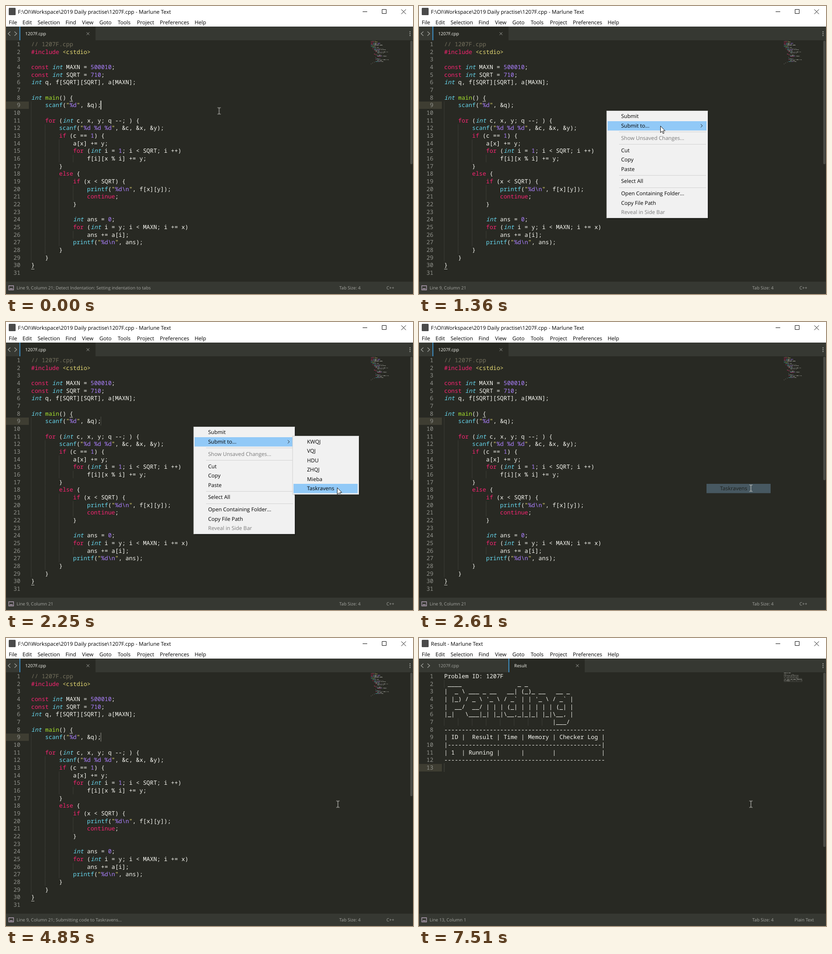
An HTML page for the animation above (8000 ms loop, 889 px wide and 630 px high).

```html
<!DOCTYPE html>
<html lang="en">
<head>
<meta charset="utf-8">
<title>Editor</title>
<style>
html, body { margin: 0; width: 100%; height: 100%; overflow: hidden; background: #282923; }
svg { display: block; width: 889px; height: 630px; text-rendering: geometricPrecision; }
text { white-space: pre; font: 11.6px 'Open Sans', 'Noto Sans', sans-serif; }
.small text { font-size: 9.65px; fill: #a4a5a0; }
.small .on { fill: #f8f8f2; }
.lines text { font: 500 12.727px 'Noto Sans Mono', 'DejaVu Sans Mono', monospace; fill: #f8f8f2; }
.lines .num { fill: #90918b; text-anchor: end; }
.lines .key { fill: #f92472; }
.lines .type { fill: #67d8ef; font-style: italic; }
.lines .call { fill: #67d8ef; }
.lines .name { fill: #a6e22c; }
.lines .lit { fill: #ac80ff; }
.lines .str { fill: #e7db74; }
.lines .note { fill: #74705d; }
.lines .mini text { font-weight: 700; }
.guide { fill: #3d3e38; }
.gray { fill: #7a7a7a; }
.sel { fill: #91c9f7; }
.mark { fill: #3fa0df; }
.stroke { fill: none; stroke: #a4a5a0; }

.step { animation: 8s step-end infinite; }
.glide { animation: 8s linear infinite; }
#code { animation-name: code; }
#result { animation-name: result; }
#caret { animation-name: caret; }
#caret2 { animation-name: caret2; }
#detect { animation-name: detect; }
#sending { animation-name: sending; }
#menu { animation-name: menu; }
#submenu { animation-name: submenu; }
#flash { animation-name: flash; }
#hover { animation-name: hover; }
#pick { animation-name: pick; }
#beam { animation-name: beam; }
#beamAt { animation-name: beamAt; }
#arrow { animation-name: arrow; }
#arrowAt { animation-name: arrowAt; }

@keyframes code { 0% { opacity: 1 } 85.25%, 100% { opacity: 0 } }
@keyframes result { 0% { opacity: 0 } 85.25%, 100% { opacity: 1 } }
@keyframes caret {
  0%, 9.375%, 22.375%, 36.125%, 48.75%, 62.25%, 75.875% { opacity: 1 }
  .375%, 8.625%, 13.125%, 21.75%, 26.375%, 35.25%, 39.625%, 48%, 52.375%, 61.375%, 65.75%, 74.75%, 79% { opacity: .7 }
  1.125%, 8%, 13.875%, 21.125%, 27.25%, 34.5%, 40.75%, 47.25%, 53.25%, 60.625%, 66.875%, 73.75%, 79.75% { opacity: .35 }
  28.125% { opacity: .12 }
  2%, 14.75%, 30.625%, 41.875%, 54.25%, 68%, 80.625%, 100% { opacity: 0 }
}
@keyframes caret2 {
  0% { opacity: 0 } 85.25% { opacity: 1 } 90.375% { opacity: .85 }
  92.875% { opacity: .55 } 93.375% { opacity: .3 } 93.875%, 100% { opacity: .1 }
}
@keyframes detect { 0% { opacity: 1 } 8.75%, 100% { opacity: 0 } }
@keyframes sending { 0% { opacity: 0 } 46% { opacity: 1 } 79.75%, 100% { opacity: 0 } }
@keyframes menu {
  0%, 13.12% { opacity: 0 } 13.125% { opacity: .3 }
  14.6%, 30.62% { opacity: 1 } 30.625%, 100% { opacity: 0 }
}
@keyframes submenu {
  0%, 21.12% { opacity: 0 } 21.125% { opacity: .2 } 22.375% { opacity: .88 }
  22.75%, 30.62% { opacity: 1 } 30.625%, 100% { opacity: 0 }
}
@keyframes flash {
  0%, 30.62% { opacity: 0 } 30.625% { opacity: .9 } 32.625% { opacity: .3 } 34.5%, 100% { opacity: 0 }
}
@keyframes hover {
  0% { opacity: 0; transform: translateY(-20.4px) }
  13.875% { opacity: 1; transform: translateY(-20.4px) }
  15.375%, 100% { opacity: 1; transform: none }
}
@keyframes pick {
  0% { opacity: 0; transform: none }
  23.5% { opacity: 1; transform: none }
  24.5% { opacity: 1; transform: translateY(20.4px) }
  25.5% { opacity: 1; transform: translateY(40.8px) }
  26.25% { opacity: 1; transform: translateY(61.2px) }
  26.875% { opacity: 1; transform: translateY(81.6px) }
  27.5%, 100% { opacity: 1; transform: translateY(102px) }
}
@keyframes beam { 0% { opacity: 1 } 13.125% { opacity: 0 } 30.625%, 100% { opacity: 1 } }
@keyframes beamAt {
  0%, 8.75% { transform: translate(465.5px, 229.5px) }
  10.25%, 30.62% { transform: translate(410.5px, 229.5px) }
  30.625%, 100% { transform: translate(725px, 363.5px) }
}
@keyframes arrow { 0% { opacity: 0 } 13.125% { opacity: 1 } 30.625%, 100% { opacity: 0 } }
@keyframes arrowAt {
  0%, 13.125% { transform: translate(410px, 229px); animation-timing-function: ease-in-out }
  17%, 21% { transform: translate(527px, 262px) }
  22.375% { transform: translate(575px, 259px) }
  23.5% { transform: translate(640px, 266px) }
  24.5% { transform: translate(675px, 284px) }
  25.5% { transform: translate(695px, 303px) }
  26.25% { transform: translate(707px, 322px) }
  26.875% { transform: translate(714px, 342px) }
  27.5% { transform: translate(720px, 357px) }
  28.125%, 100% { transform: translate(723px, 362px) }
}
</style>
</head>
<body>
<script type="text/plain" id="codeText">
// 1207F.cpp
#include <cstdio>

const int MAXN = 500010;
const int SQRT = 710;
int q, f[SQRT][SQRT], a[MAXN];

int main() {
    scanf("%d", &q);

    for (int c, x, y; q --; ) {
        scanf("%d %d %d", &c, &x, &y);
        if (c == 1) {
            a[x] += y;
            for (int i = 1; i < SQRT; i ++)
                f[i][x % i] += y;
        }
        else {
            if (x < SQRT) {
                printf("%d\n", f[x][y]);
                continue;
            }

            int ans = 0;
            for (int i = y; i < MAXN; i += x)
                ans += a[i];
            printf("%d\n", ans);
        }
    }
}

</script>
<script type="text/plain" id="resultText">
Problem ID: 1207F
 ____                _ _
|  _ \ ___ _ __   __| (_)_ __   __ _
| |_) / _ \ '_ \ / _` | | '_ \ / _` |
|  __/  __/ | | | (_| | | | | | (_| |
|_|   \___|_| |_|\__,_|_|_| |_|\__, |
                               |___/
----------------------------------------------
| ID |  Result | Time | Memory | Checker Log |
|--------------------------------------------|
| 1  | Running |      |        |             |
----------------------------------------------

</script>

<svg viewBox="0 0 889 630">
  <rect width="889" height="630" fill="#282923"/>
  <rect width="889" height="45" fill="#fff"/>
  <rect x="6" y="4" width="15" height="16" rx="1.5" fill="#4a4a4a"/>
  <path d="M779 12.5h10M821.5 7.5h9v9h-9zM863.5 7.5l10 10M873.5 7.5l-10 10" fill="none" stroke="#111"/>
  <g id="bar"></g>
  <rect y="45" width="889" height="30" fill="#363832"/>
  <rect y="603" width="889" height="27" fill="#363832"/>
  <path class="stroke" stroke-width="1.2" d="M9.5 56l-5 4.5 5 4.5M18.5 56l5 4.5-5 4.5"/>
  <path d="M881.5 55.5h2v2h-2zM881.5 59.5h2v2h-2zM881.5 63.5h2v2h-2z" fill="#b0b1ac"/>
  <path d="M6 612h10.5v9h-10.5z" fill="none" stroke="#b5a3b8" stroke-width="1.3"/>
  <path d="M8 617.5h6.5v1.8h-6.5z" fill="#b5a3b8"/>
  <g class="small"><text x="728" y="620">Tab Size: 4</text></g>

  <g id="code" class="step">
    <text x="26" y="17">F:\OI\Workspace\2019 Daily practise\1207F.cpp - Marlune Text</text>
    <rect x="30" y="45" width="165.5" height="30" fill="#282923"/>
    <rect class="mark" x="29.5" y="45" width="1.7" height="30"/>
    <path class="stroke" d="M176 57.5l6 6M182 57.5l-6 6"/>
    <rect x="883" y="76" width="5" height="270" rx="2" fill="#4b4c47"/>
    <g class="small">
      <text class="on" x="42" y="64">1207F.cpp</text>
      <text x="23" y="620">Line 9, Column 21</text>
      <text x="103.4" y="620" id="detect" class="step">; Detect Indentation: Setting indentation to tabs</text>
      <text x="103.4" y="620" id="sending" class="step">; Submitting code to Taskravens...</text>
      <text x="831" y="620">C++</text>
    </g>
    <rect y="209" width="50" height="16" fill="#3e3d32"/>
    <g id="codeLines" class="lines"></g>
    <path d="M139 208.5h7M55 575.5h7" stroke="#c8c8c2"/>
    <rect id="caret" class="step" x="206.5" y="207" width="1.6" height="19.5" fill="#f8f8f0"/>
  </g>

  <g id="result" class="step">
    <text x="26" y="17">Result - Marlune Text</text>
    <rect x="196" y="45" width="166" height="30" fill="#282923"/>
    <rect class="mark" x="195.5" y="45" width="1.7" height="30"/>
    <path class="stroke" d="M343 57.5l6 6M349 57.5l-6 6"/>
    <rect x="883" y="76" width="5" height="381" rx="2" fill="#4b4c47"/>
    <g class="small">
      <text x="42" y="64">1207F.cpp</text>
      <text class="on" x="208" y="64">Result</text>
      <text x="23" y="620">Line 13, Column 1</text>
      <text x="820" y="620">Plain Text</text>
    </g>
    <rect y="275.5" width="50" height="16.5" fill="#3e3d32"/>
    <g id="resultLines" class="lines"></g>
    <rect id="caret2" class="step" x="54.3" y="274" width="1.6" height="19" fill="#f8f8f0"/>
  </g>

  <g id="menu" class="glide">
    <rect x="413" y="232" width="220" height="234" fill="#000" opacity=".3"/>
    <rect x="410" y="229.5" width="220.5" height="234" fill="#f1f1f1" stroke="#cfcfcf"/>
    <rect id="hover" class="sel step" x="412" y="252" width="216" height="20.4"/>
    <path d="M437 275.5h190M437 302.5h190M437 370.5h190M437 397.5h190" stroke="#d2d2d2"/>
    <path d="M615.5 258.5l3.5 3.5-3.5 3.5" fill="none" stroke="#222"/>
    <g id="items"></g>
  </g>
  <g id="submenu" class="glide">
    <rect x="629" y="252" width="144" height="127" fill="#000" opacity=".3"/>
    <rect x="626" y="249.5" width="144.5" height="127.5" fill="#f1f1f1" stroke="#cfcfcf"/>
    <rect id="pick" class="sel step" x="628" y="252" width="140" height="20.4"/>
    <g id="sites"></g>
  </g>
  <g id="flash" class="glide">
    <rect class="sel" x="628" y="354" width="140" height="20.4"/>
    <text x="657.5" y="368">Taskravens</text>
  </g>

  <g id="beam" class="step">
    <path id="beamAt" class="glide" d="M-3.5 -7h2.5l1 1 1-1h2.5M0 -6v12M-3.5 7h2.5l1-1 1 1h2.5" fill="none" stroke="#d8d8d4"/>
  </g>
  <g id="arrow" class="step">
    <path id="arrowAt" class="glide" d="M.5 .5v14.5l3.3-3.2 2.3 5.3 2.2-1-2.3-5.1h4.6z" fill="#fff" stroke="#111"/>
  </g>
</svg>

<script>
const CHAR = 7.636, ROW = 16.667, LEFT = 55;
const byId = id => document.getElementById(id);
const esc = s => s.replace(/&/g, '&amp;').replace(/</g, '&lt;').replace(/ /g, '\u00a0');
const label = (x, y, s, cls = '') => `<text x="${x}" y="${y}" class="${cls}">${esc(s)}</text>`;
const span = (cls, s) => `<tspan class="${cls}">${esc(s)}</tspan>`;

const token = /(\/\/.*|#include|"[^"]*"|<\w+>|\b(?:const|for|if|else|continue|int|main|scanf|printf|\d+)\b)/;

function paint(s) {
  if (s.startsWith('//')) return span('note', s);
  if (s[0] === '"')
    return s.split(/(%d|\\n)/).map((p, i) => span(i % 2 ? 'lit' : 'str', p)).join('');
  if (s[0] === '<') return span('str', s);
  if (s === 'int') return span('type', s);
  if (s === 'main') return span('name', s);
  if (/^(scanf|printf)$/.test(s)) return span('call', s);
  return span(/^\d/.test(s) ? 'lit' : 'key', s);
}
const highlight = s => s.split(token).map((p, i) => i % 2 ? paint(p) : esc(p)).join('');

function layout(name, format) {
  const rows = byId(name + 'Text').textContent.slice(1, -1).split('\n');
  const depth = i => rows[i] ? rows[i].search(/\S/) : 0;
  let text = '', extra = '';
  rows.forEach((row, i) => {
    const y = 88 + i * ROW;
    if (row) text += `<text x="${LEFT}" y="${y}">${format(row)}</text>`;
    extra += label(31.5, y, String(i + 1), 'num');
    const indent = row ? depth(i) : Math.min(depth(i - 1), depth(i + 1));
    for (let c = 0; c < indent; c += 4)
      extra += `<rect class="guide" x="${LEFT + c * CHAR - .5}" y="${y - 12.7}" width="1" height="${ROW}"/>`;
  });
  // The overview is drawn twice so that its tiny strokes stay bright.
  const mini = `<g class="mini" transform="translate(797 76) scale(.114 .102) translate(${-LEFT} -75)">${text.repeat(2)}</g>`;
  byId(name + 'Lines').innerHTML = extra + text + mini;
}

layout('code', highlight);
layout('result', esc);

byId('bar').innerHTML = [
  [6, 'File'], [36, 'Edit'], [69, 'Selection'], [130, 'Find'], [166, 'View'], [204, 'Goto'],
  [244, 'Tools'], [286, 'Project'], [336, 'Preferences'], [412, 'Help']
].map(([x, s]) => label(x, 40, s)).join('');

byId('items').innerHTML = [
  [245, 'Submit'], [266, 'Submit to...'], [293, 'Show Unsaved Changes...', 'gray'],
  [320, 'Cut'], [340, 'Copy'], [361, 'Paste'], [387, 'Select All'],
  [414, 'Open Containing Folder...'], [434.5, 'Copy File Path'], [455, 'Reveal in Side Bar', 'gray']
].map(([y, s, cls]) => label(441.5, y, s, cls)).join('');

byId('sites').innerHTML = ['KWQJ', 'VQJ', 'HDU', 'ZHQJ', 'Mieba', 'Taskravens']
  .map((s, i) => label(657.5, 266 + i * 20.4, s)).join('');
</script>
</body>
</html>
```
